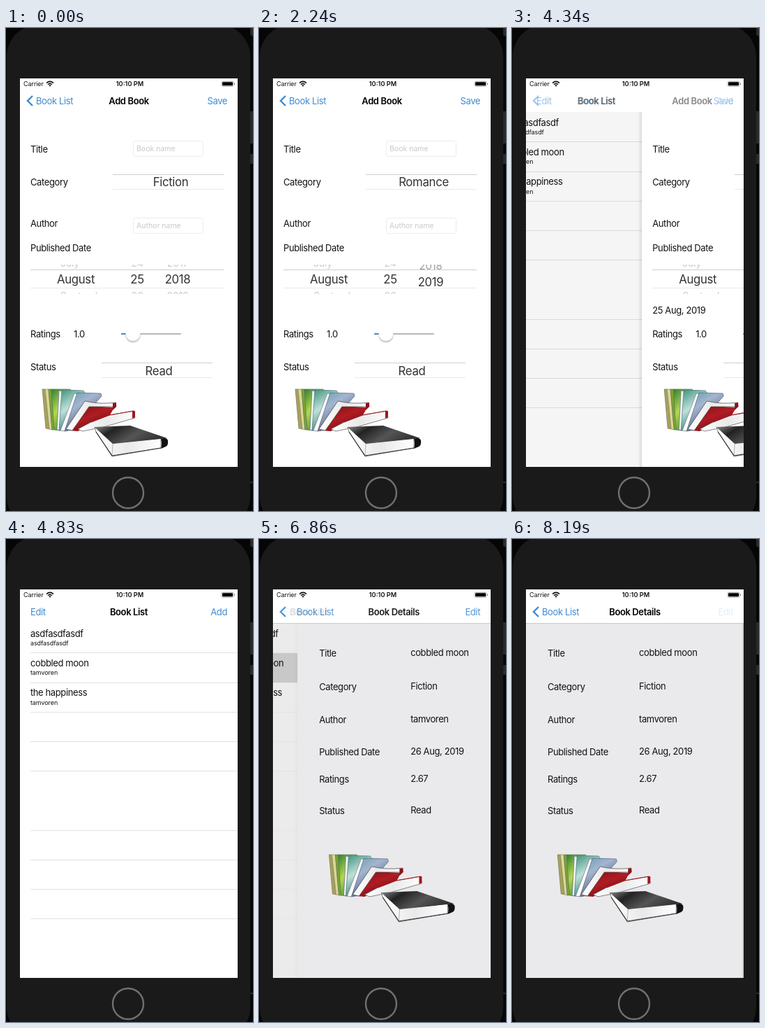
Animation, 354 px wide and 690 px high, one loop 8260 ms. Source, as an HTML page:

```html
<!DOCTYPE html>
<html lang="en">
<head>
<meta charset="utf-8">
<title>Book app</title>
<style>
  html, body { margin: 0; width: 100%; height: 100%; overflow: hidden; background: #060606; }
  svg { display: block; width: 100vw; height: 100vh; }
  text { font: 13px Inter, sans-serif; letter-spacing: -.03em; fill: #111; white-space: pre; }
  .blue { fill: #3d8bd1; }
  .title { font-weight: 600; fill: #000; }
  .small { font-size: 9px; letter-spacing: -.01em; }
  .time { font-size: 9.2px; font-weight: 600; letter-spacing: 0; }
  .hint { font-size: 10.5px; letter-spacing: 0; fill: #c9c9ce; }
  .wheel { font-size: 16.8px; letter-spacing: -.02em; fill: #333; }
</style>
</head>
<body>
<svg viewBox="0 0 354 690">
  <defs>
    <clipPath id="screenClip"><rect x="20" y="72" width="312" height="555"/></clipPath>
    <clipPath id="categoryClip"><rect x="153" y="209" width="159" height="21"/></clipPath>
    <clipPath id="dateClip"><rect x="35" y="338" width="277" height="42"/></clipPath>
    <clipPath id="statusClip"><rect x="137" y="479" width="159" height="20"/></clipPath>
    <linearGradient id="edge"><stop offset="0" stop-color="#000" stop-opacity="0"/><stop offset="1" stop-color="#000" stop-opacity=".2"/></linearGradient>
    <linearGradient id="green" x2=".6" y2="1"><stop stop-color="#2f7d35"/><stop offset=".5" stop-color="#b4d850"/><stop offset="1" stop-color="#3c8a2e"/></linearGradient>
    <linearGradient id="teal" x2=".4" y2="1"><stop stop-color="#3c8f7c"/><stop offset=".5" stop-color="#bfe0d8"/><stop offset="1" stop-color="#34807a"/></linearGradient>
    <linearGradient id="slate" x2=".6" y2="1"><stop stop-color="#5f9bb0"/><stop offset=".4" stop-color="#a4b5d0"/><stop offset="1" stop-color="#414b7c"/></linearGradient>
    <linearGradient id="red" x2=".7" y2="1"><stop stop-color="#7d0f15"/><stop offset=".5" stop-color="#b01c24"/><stop offset="1" stop-color="#6a0a0f"/></linearGradient>
    <linearGradient id="black" x2="1" y2=".4"><stop stop-color="#8a8a8a"/><stop offset=".3" stop-color="#222"/><stop offset=".65" stop-color="#555"/><stop offset="1" stop-color="#333"/></linearGradient>
    <linearGradient id="pages" x2="1"><stop stop-color="#fff"/><stop offset=".5" stop-color="#e9e9e9"/><stop offset="1" stop-color="#fff"/></linearGradient>
    <g id="books" stroke-width=".7" stroke-linejoin="round">
      <path d="M52 516l4 0 6 57-5-1z" fill="#a9a157" stroke="#776"/>
      <path d="M56 516l5 0 5 58-4-1z" fill="#d9d896" stroke="#886"/>
      <path d="M61 516l4 0 5 58-4 0z" fill="#7fa32f" stroke="#575"/>
      <path d="M65 516l27 0 2 4-17 55-8-1z" fill="url(#green)" stroke="#575"/>
      <path d="M76 518l6 1-5 56-4-1z" fill="#f4f6f2" stroke="#668"/>
      <path d="M80 517l31 1 4 6-26 51-13 0z" fill="url(#teal)" stroke="#477"/>
      <path d="M98 522l6 1-20 53-6-1z" fill="#fff" stroke="#778"/>
      <path d="M102 521l34 1 1 4-9 10-32 38-12 2z" fill="url(#slate)" stroke="#567"/>
      <path d="M118 540l37 2-6 11-24 10-22 13-12-1z" fill="url(#red)"/>
      <path d="M113 533q22 5 44 2l1 6-39 0-24 34-9-2z" fill="url(#pages)" stroke="#444"/>
      <path d="M153 536l5-1 0 6-5 5z" fill="#8d1118"/>
      <path d="M103 573l19-10 26-10 35-6 2 10-45 13-30 6z" fill="url(#pages)" stroke="#555"/>
      <path d="M122 563l26-10 35-6" fill="none" stroke="#a3151c" stroke-width="1.2"/>
      <path d="M181 547l4 0 0 9-4 2z" fill="#a3151c"/>
      <path d="M127 570l26 23 69-7 0 14-70 12-23-35z" fill="url(#pages)" stroke="#444"/>
      <path d="M127 570l51-2 53 18-78 8z" fill="url(#black)"/>
      <path d="M153 594l-1 17" fill="none" stroke="#999"/>
      <path d="M222 587q8-3 10 2 1 7-3 9l-7 3q2-7 0-14z" fill="#111"/>
      <path d="M129 577l23 34 70-11" fill="none" stroke="#333" stroke-width="1.200"/>
    </g>
  </defs>

  <rect width="354" height="690" fill="#060606"/>
  <path d="M350 0h4v12l-4-2zM350 119h4v46h-4zM350 180h4v14h-4zM350 648h4v2h-4z" fill="#2a2a2a"/>
  <rect x="1" y="-5" width="349" height="720" rx="46" fill="#1a1a1a"/>
  <circle cx="175" cy="664" r="22" fill="#1a1a1a" stroke="#707070" stroke-width="2.4"/>

  <g clip-path="url(#screenClip)">
    <rect x="20" y="72" width="312" height="555" fill="#fff"/>
    <g id="list"><g id="rules"></g></g>
    <rect id="dim" x="20" y="120" width="312" height="507"/>
    <g id="page">
      <rect id="shadow" x="14" y="120" width="6" height="507" fill="url(#edge)"/>
      <g id="form"><rect x="20" y="120" width="312" height="507" fill="#fff"/></g>
      <g id="detail">
        <rect x="20" y="120" width="312" height="507" fill="#eaeaec"/>
        <use href="#books" x="13.3" y="-65"/>
        <rect id="rightLine" x="330.5" y="121" width="1" height="506" fill="#b4b4b6"/>
      </g>
    </g>
    <rect x="20" y="72" width="312" height="48" fill="#fff"/>
    <rect id="barLine" x="20" y="120" width="312" height="1" fill="#c9c9cc"/>
    <g id="nav"></g>
    <path id="chevron" d="M38 97l-7 7 7 7" fill="none" stroke="#3d8bd1" stroke-width="2.4"/>
    <g id="status">
      <g fill="none" stroke="#111" stroke-width="1.5">
        <path d="M58 78.6q5-4.400 10 0M60 80.700q3-2.600 6 0"/>
      </g>
      <path d="M61.300 82q1.700-1.500 3.400 0l-1.700 1.800z" fill="#111"/>
      <rect x="309" y="76.300" width="17" height="7" rx="1.800" fill="none" stroke="#888" stroke-width=".7"/>
      <rect x="310" y="77.300" width="15" height="5" rx="1"/>
      <rect x="327" y="78.500" width="1" height="2.600" fill="#888"/>
    </g>
  </g>
</svg>

<script>
const LOOP = 8260, STEP = 70, WIDTH = 312;
const POP_START = 4235, PUSH_START = 6640;
const BOOK = 'cobbled moon', WRITER = 'tamvoren';
const $ = id => document.getElementById(id);

function add(parent, tag, attrs, content = '') {
  const node = document.createElementNS('http://www.w3.org/2000/svg', tag);
  for (const key in attrs) node.setAttribute(key, attrs[key]);
  node.textContent = content;
  return parent.appendChild(node);
}

// Places text by the middle of its capitals.
function label(parent, x, middle, content, cls = '', anchor = 'start') {
  const node = add(parent, 'text', { x, class: cls, 'text-anchor': anchor }, content);
  node.setAttribute('y', middle + .36 * parseFloat(getComputedStyle(node).fontSize));
  return node;
}

const line = (parent, x, y, width, fill) => add(parent, 'rect', { x, y, width, height: 1, fill });

function wheel(clip, items, x, middle, gap, anchor = 'middle') {
  const group = add($('form'), 'g', { 'clip-path': `url(#${clip})` });
  const rows = items.map(item => label(group, 0, 0, item, 'wheel', anchor));
  return position => rows.forEach((row, i) => {
    const d = i - position, far = Math.min(Math.abs(d), 1);
    const shift = anchor === 'start' ? 5 * far : 0;
    const scale = 1 - .15 * far * far;
    row.setAttribute('transform', `translate(${x + shift} ${middle + gap * d}) scale(${scale})`);
    row.setAttribute('opacity', 1 - Math.max(0, far - .5) * 1.5);
  });
}

// Book list
const list = $('list');
const highlight = add(list, 'rect', { x: 20, y: 163, width: WIDTH, height: 42, fill: '#d9d9d9' });
[['asdfasdfasdf', 'asdfasdfasdf'], [BOOK, WRITER], ['the happiness', WRITER]].forEach(([title, author], i) => {
  label(list, 35, 135 + 42.2 * i, title);
  label(list, 35, 149 + 42.2 * i, author, 'small');
});
[1, 2, 3, 4, 5, 7, 8, 9, 10].forEach(n => line($('rules'), 35, Math.round(120.2 + 42.2 * n), 297, '#e2e2e4'));

// Form
const form = $('form');
[['Title', 173], ['Category', 220], ['Author', 279], ['Published Date', 314], ['Ratings', 437], ['Status', 484]]
  .forEach(([name, y]) => label(form, 35, y, name));
label(form, 97, 437, '1.0');
const dateLabel = label(form, 35, 403, '25 Aug, 2019');
[['Book name', 161], ['Author name', 271]].forEach(([hint, y]) => {
  add(form, 'rect', { x: 182.5, y: y + .5, width: 100, height: 22, rx: 3, fill: '#fff', stroke: '#ececec' });
  label(form, 187, y + 11, hint, 'hint');
});
const turnCategory = wheel('categoryClip', ['Fiction', 'Adventure', 'Romance'], 236, 220, 18);
wheel('dateClip', ['July', 'August', 'September'], 73, 359, 23.5, 'start')(1);
wheel('dateClip', ['24', '25', '26'], 188, 359, 23.5)(1);
const turnYear = wheel('dateClip', ['2017', '2018', '2019', '2020'], 246, 359, 23.5);
wheel('statusClip', ['Read'], 219, 489.5, 18)(0);
[[153, 209, 230, 159], [35, 345, 371, 277], [137, 478, 499, 159]].forEach(([x, top, bottom, width]) => {
  line(form, x, top, width, '#cfcfcf');
  line(form, x, bottom, width, '#e9e9e9');
});
add(form, 'rect', { x: 165, y: 436, width: 86, height: 2, rx: 1, fill: '#b7b7b9' });
add(form, 'rect', { x: 165, y: 436, width: 12, height: 2, rx: 1, fill: '#3d8bd1' });
[[439.5, 11, .06], [438.3, 10.8, .14]].forEach(([cy, r, opacity]) => add(form, 'circle', { cx: 182, cy, r, opacity }));
add(form, 'circle', { cx: 182, cy: 436.5, r: 10.5, fill: '#fff' });
add(form, 'use', { href: '#books' });

// Details
[['Title', BOOK, 163], ['Category', 'Fiction', 211], ['Author', WRITER, 258],
 ['Published Date', '26 Aug, 2019', 304], ['Ratings', '2.67', 343], ['Status', 'Read', 388]]
  .forEach(([name, value, y]) => {
    label($('detail'), 51, y, name);
    label($('detail'), 182, y - .4, value);
  });

// Bars
const nav = $('nav');
const back = label(nav, 43, 104, 'Book List', 'blue');
const listTitle = label(nav, 176, 104, 'Book List', 'title', 'middle');
const pageTitle = label(nav, 176, 104, '', 'title', 'middle');
const listEdit = label(nav, 35, 104, 'Edit', 'blue');
const listAdd = label(nav, 317, 104, 'Add', 'blue', 'end');
const pageAction = label(nav, 317, 104, '', 'blue', 'end');
label($('status'), 25, 80, 'Carrier', 'small');
label($('status'), 177.5, 80, '10:10 PM', 'time', 'middle');

function ease(t, start, end) {
  const u = Math.min(1, Math.max(0, (t - start) / (end - start)));
  return u * u * (3 - 2 * u);
}

// Critically damped spring, 0 to 1.
function spring(ms) {
  const u = Math.max(0, ms) * .017;
  return 1 - (1 + u) * Math.exp(-u);
}

const slide = (node, x) => node.setAttribute('transform', `translate(${x} 0)`);
const fade = (node, opacity) => node.setAttribute('opacity', opacity);

function draw(t) {
  const details = t > 5500;
  const cover = details ? spring(t - PUSH_START) : 1 - spring(t - POP_START);
  const open = 1 - cover;

  turnCategory(2 * ease(t, 490, 1400));
  turnYear(1 + ease(t, 1820, 2380));
  fade(dateLabel, t >= 2520 ? 1 : 0);

  slide(list, -.3 * WIDTH * cover);
  slide($('page'), WIDTH * open);
  fade($('dim'), .088 * cover);
  fade($('rules'), Math.min(1, 2 * open));
  fade($('shadow'), open);
  fade(highlight, t >= 6650 ? 1 : 0);
  fade($('form'), details ? 0 : 1);
  fade($('detail'), details ? 1 : 0);
  fade($('page'), cover > .002 ? 1 : 0);
  fade($('rightLine'), cover > .99 ? 1 : 0);
  fade($('barLine'), details ? cover : 0);

  pageTitle.textContent = details ? 'Book Details' : 'Add Book';
  pageAction.textContent = details ? 'Edit' : 'Save';
  slide(pageTitle, 154 * open);
  slide(back, 98 * open);
  slide(listTitle, -118 * cover);
  [pageTitle, back, $('chevron')].forEach(node => fade(node, cover));
  [listTitle, listEdit].forEach(node => fade(node, open));
  fade(listAdd, open * open);
  fade(pageAction, t >= 8120 ? .15 : cover);
}

function tick(now) {
  draw(Math.floor((now % LOOP) / STEP) * STEP);
  requestAnimationFrame(tick);
}
draw(0);
requestAnimationFrame(tick);
</script>
</body>
</html>
```
